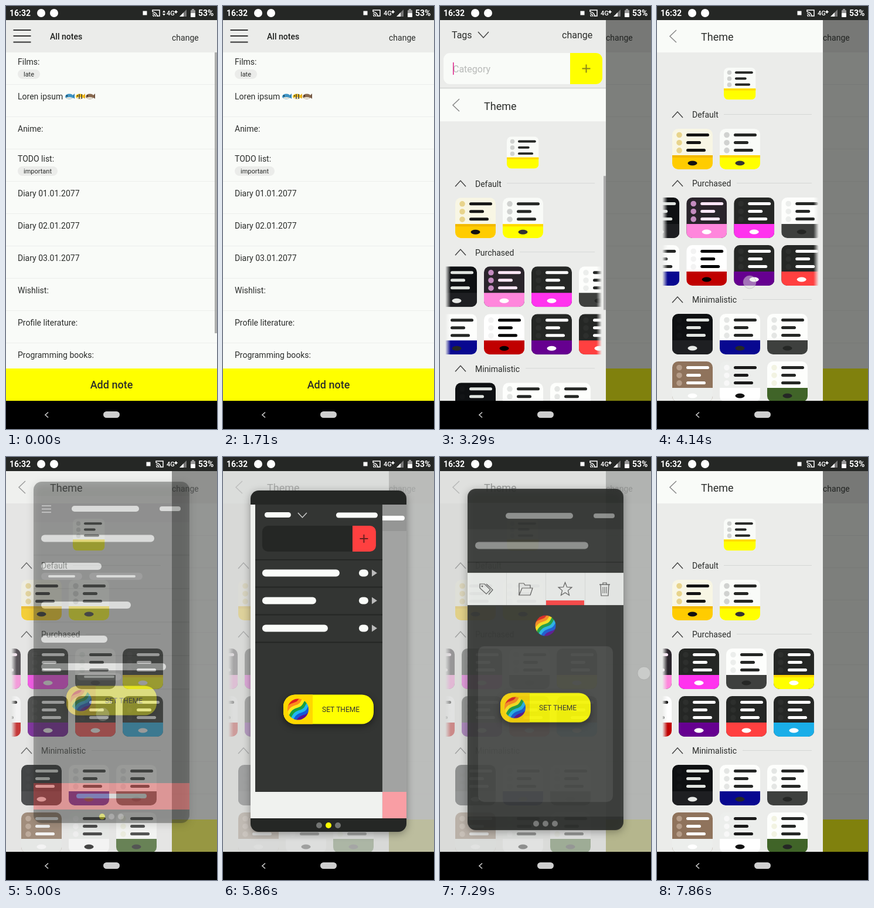
These frames come from a looping animation (360 by 720 pixels, 8 s). An HTML page with a canvas:

```html
<!DOCTYPE html>
<html lang="en">
<head>
<meta charset="utf-8">
<title>Notes app</title>
<style>
html, body { margin: 0; width: 100%; height: 100%; overflow: hidden; background: #000; }
canvas { display: block; }
</style>
</head>
<body>
<canvas id="stage" width="360" height="720"></canvas>
<script>
const LOOP = 8000, INK = '#2b2d2b', DARK = '#252725', BODY = '#333533',
      PAPER = '#f9fbf8', PANEL = '#ebecea', RED = '#ff4040', YELLOW = '#ffff00', AMBER = '#ffd800';
const screen = document.getElementById('stage').getContext('2d');
const layer = Object.assign(document.createElement('canvas'), { width: 360, height: 720 }).getContext('2d');
let c = screen;

// Timing helpers
const ramp = (t, a, b) => Math.min(1, Math.max(0, (t - a) / (b - a)));
const easeOut = (u, n) => 1 - (1 - u) ** n;
const smooth = u => u * u * (3 - 2 * u);

// Drawing helpers
function box(x, y, w, h, fill, r = 0) {
  c.fillStyle = fill;
  c.beginPath();
  c.roundRect(x, y, w, h, r);
  c.fill();
}
function oval(x, y, rx, fill, ry = rx) {
  c.fillStyle = fill;
  c.beginPath();
  c.ellipse(x, y, rx, ry, 0, 0, 7);
  c.fill();
}
function text(s, x, y, size, fill = INK, weight = 400, align = 'left') {
  c.font = `${weight} ${size}px Roboto, sans-serif`;
  c.textAlign = align;
  c.fillStyle = fill;
  c.fillText(s, x, y + size * 0.355);
}
function trace(pts) {
  c.beginPath();
  for (let i = 0; i < pts.length; i += 2) c.lineTo(pts[i], pts[i + 1]);
}
function line(pts, color, width = 1, close) {
  trace(pts);
  if (close) c.closePath();
  c.strokeStyle = color;
  c.lineWidth = width;
  c.stroke();
}
function shape(pts, fill) {
  trace(pts);
  c.fillStyle = fill;
  c.fill();
}
function group(dx, dy, draw, clip) {
  c.save();
  c.translate(dx, dy);
  if (clip) {
    c.beginPath();
    c.rect(...clip);
    c.clip();
  }
  draw();
  c.restore();
}
const bar = (x1, x2, y, fill = '#fafcf9', h = 12) => box(x1, y - h / 2, x2 - x1, h, fill, h / 2);
const arrow = (x, y, fill) => shape([x, y - 6, x + 9, y, x, y + 6], fill);
const plus = (x, y, color, r = 7) => {
  line([x - r, y, x + r, y], color, 2);
  line([x, y - r, x, y + r], color, 2);
};

function statusBar(t) {
  box(0, 0, 360, 24, DARK);
  text('16:32', 6, 12, 14, '#fff', 700);
  oval(60, 12, 7, '#fff');
  oval(82, 12, 7, '#fff');
  const busy = t < 790, x = busy ? 0 : 6;
  box(233.5 + x, 8.5, 7, 7, '#fff');
  line([250 + x, 10, 250 + x, 7, 262 + x, 7, 262 + x, 17, 257 + x, 17], '#fff', 1.5);
  for (const r of [2, 5, 8]) {
    c.beginPath();
    c.arc(250 + x, 18, r, -Math.PI / 2, 0);
    c.stroke();
  }
  if (busy) {
    shape([267, 11, 269.5, 7.5, 272, 11], '#fff');
    shape([267, 13, 269.5, 16.5, 272, 13], '#fff');
  }
  text('4G', 274, 12, 11, '#fff', 500);
  plus(290, 10, '#fff', 2.5);
  shape([296, 18, 308, 18, 308, 6], '#777');
  shape([296, 18, 303, 18, 303, 11], '#fff');
  box(315, 7, 8, 12, '#999', 1);
  box(317, 5, 4, 2, '#999');
  box(315, 12, 8, 7, '#fff', 1);
  text('53%', 328, 12, 14, '#fff', 700);
}

function navBar() {
  box(0, 672, 360, 48, '#000');
  line([72, 691.5, 67, 696, 72, 700.5], '#ccc', 1.6);
  box(166, 690, 28, 11, '#cfcfcf', 5.5);
}

function fish(x, y, body, tail, stripe) {
  shape([x + 3, y, x + 8, y - 5, x + 8, y + 4], tail);
  oval(x - 1, y, 7, body, 4.5);
  oval(x - 1, y + 2.5, 5, '#e8e4d8', 1.6);
  if (stripe) for (const d of [-2, 2]) line([x + d, y - 4, x + d, y + 4], stripe, 1.5);
  oval(x - 5, y - 1, 1, '#111');
}

const notes = ['Films:', 'Loren ipsum', 'Anime:', 'TODO list:', 'Diary 01.01.2077', 'Diary 02.01.2077',
  'Diary 03.01.2077', 'Wishlist:', 'Profile literature:', 'Programming books:'];
const noteTags = { 0: ['late', 38], 3: ['important', 68] };

function notesPage(t) {
  box(0, 24, 360, 648, PAPER);
  notes.forEach((name, i) => {
    const y = 99 + i * 55, tag = noteTags[i];
    text(name, 20, tag ? y - 4 : y, 14);
    if (tag) {
      box(20, y + 9, tag[1], 16, PANEL, 8);
      text(tag[0], 20 + tag[1] / 2, y + 17, 11, INK, 400, 'center');
    }
    box(0, y + 34, 360, 1, '#eceeec');
  });
  fish(109, 154, '#3d93c4', '#2f7fb0');
  fish(127, 154, '#f5c21c', '#e5a910', '#3a3a3a');
  fish(144, 154, '#8a6a50', '#705440');
  box(0, 24, 360, 55, PANEL);
  for (const y of [41, 51, 61.5]) line([12.5, y, 42.5, y], '#333', 2);
  text('All notes', 75, 52, 14, '#1d1f1d', 500);
  text('change', 283, 54, 14);
  box(356, 79, 4, 478, `rgba(150,150,150,${0.75 * (1 - ramp(t, 700, 870))})`);
  box(0, 617, 360, 55, YELLOW);
  text('Add note', 180, 645, 18, INK, 500, 'center');
}

const tags = [['All notes', 11], ['important', 2], ['late', 2], ['work', 1], ['ideas', 2]];

function drawer(t) {
  box(0, 24, 283, 648, PANEL);
  text('Tags', 20, 49, 16);
  line([65, 44, 74, 54, 83, 44], '#444', 1.5);
  text('change', 208, 49, 16);
  box(6, 80, 271, 53, PAPER, 11);
  box(222, 80, 55, 53, YELLOW, [0, 11, 11, 0]);
  plus(249.5, 106.5, '#8a8518');
  text('Category', 22, 107, 16, '#b8bab8');
  if (t > 2700) box(22, 96, 1.5, 21, '#e0218a');
  box(0, 139, 283, 1, '#cfd1cf');
  tags.forEach(([name, n], i) => {
    const y = 170 + i * 61;
    text(name, 20, y, i ? 14 : 16);
    text(n, i ? 251 : 254, y, i ? 12 : 15, '#444', 400, 'right');
    arrow(i ? 256 : 259, y, '#555');
    box(0, y + 30, 283, 1, '#cfd1cf');
  });
  box(0, 617, 283, 55, '#1a1c1a');
  group(0, 0, () => text('The Sun contains 99.86% of the mass in the Solar System', 111 - (t - 2000) * 0.04, 645, 16, '#fff'),
    [0, 617, 283, 55]);
}

// Theme colours: paper, dots, lines, footer, pill, strip
const onDark = (foot, strip) => [DARK, '#2d2f2d', '#fff', foot, '#fff', strip];
const onLight = (foot, dot = '#e4e6e4') => ['#fdfefc', dot, DARK, foot, DARK];
const black = ['#0e1012', '#121416', '#e0e4e0', '#1e1f22', '#e6e8e6'];
const plain = [PAPER, '#d0d2d0', DARK, YELLOW, '#333', AMBER];
const cream = ['#f8f6e4', '#e8d48c', '#141414', '#ffcc00', '#111', '#f2b800'];
const bought = [
  [black, ['#2a242b', '#c48cc0', '#ffe6f8', '#ff86dc', '#fff'], onDark('#ff33ee'), onLight('#3e403e', '#eceeec'), onDark(YELLOW, AMBER)],
  [onLight('#080890', '#fff'), ['#fff', '#f3f3f3', '#000', '#c00000', '#000'], onDark('#660090'), onDark(RED), onDark('#1aaee8')]
];
const minimal = [
  [black, onLight('#080890'), onLight('#3e403e')],
  [['#8f735c', '#b59c88', '#fff', '#eceeec', '#fff'], ['#eceeec', '#f8f8f8', '#1a1a1a', '#fff', '#111'], onLight('#406428', '#f2f3e2')]
];

function tile(x, y, [paper, dot, ink, foot, pill, strip], scale = 1) {
  c.save();
  c.translate(x, y);
  c.scale(scale, scale);
  c.beginPath();
  c.roundRect(0, 0, 69, 69, 10);
  c.clip();
  box(0, 0, 69, 69, paper);
  [39, 25, 33].forEach((w, i) => {
    oval(12, 10.5 + i * 13.2, 4.8, dot);
    bar(24, 24 + w, 10.5 + i * 13, ink, 5);
  });
  box(0, 45, 69, 24, foot);
  if (strip) box(0, 45, 69, 4, strip);
  if (scale === 1) oval(34.5, 58.5, 8, pill, 4);
  c.restore();
}

function section(name, y, x) {
  line([26, y + 5, 35, y - 5, 44, y + 5], '#444', 1.5);
  text(name, 60, y + 0.5, 14);
  box(x, y - 1, 264 - x, 1, '#d5d7d5');
}

function edgeFade(x, from, to) {
  const g = c.createLinearGradient(x, 0, x + 9, 0);
  g.addColorStop(0, `rgba(235,236,234,${from})`);
  g.addColorStop(1, `rgba(235,236,234,${to})`);
  box(x, 322, 9, 158, g);
}

function themePanel(t) {
  box(0, 24, 283, 648, PANEL);
  box(0, 24, 283, 55, PAPER);
  line([33, 41, 22, 51.5, 33, 62], '#888', 1.5);
  text('Theme', 75, 53, 18);
  tile(114, 105, plain, 0.79);
  section('Default', 185, 114);
  tile(26, 209, cream);
  tile(107, 209, plain);
  section('Purchased', 302, 136);
  const scroll = 20 + 119 * smooth(ramp(t, 3950, 4600));
  group(0, 0, () => {
    bought.forEach((row, j) => row.forEach((theme, i) => tile(14 + i * 81 - scroll, 326 + j * 81, theme)));
    edgeFade(9, 1, 0);
    edgeFade(267, 0, 1);
  }, [9, 322, 267, 158]);
  section('Minimalistic', 500, 146);
  minimal.forEach((row, j) => row.forEach((theme, i) => tile(26 + i * 81, 524 + j * 81, theme)));
  box(279, 172, 4, 228, `rgba(150,150,150,${0.75 * (1 - ramp(t, 3700, 3900))})`);
}

function ball(x, y, r) {
  c.save();
  c.beginPath();
  c.arc(x, y, r, 0, 7);
  c.clip();
  c.translate(x, y);
  c.rotate(-0.7);
  ['#e02020', '#ff8c1a', '#ffe81a', '#18a040', '#20b8f0', '#1458d8', '#5a1090'].forEach((color, i) => {
    const pts = [];
    for (let k = -20; k <= 20; k += 2) pts.push(k, (i - 3) * r * 0.3 + Math.sin(k / 5) * 2);
    line(pts, color, r * 0.33);
  });
  c.restore();
}

function previewHeader(ink) {
  box(47, 81, 266, 45, '#2c2e2c');
  bar(112, 227, 103, ink, 10);
  bar(262, 298, 103, ink, 8);
  bar(60, 253, 153.5, ink);
  box(47, 181, 266, 2, DARK);
}

function previewList() {
  box(47, 81, 266, 534, BODY);
  previewHeader('#fafcf9');
  for (const y of [98, 103.5, 109]) line([61, y, 77, y], '#ddd', 1.5);
  [[163, 201], [213, 267], [173, 325], [273, 372]].forEach(([x, y], i) => {
    bar(60, x, y);
    box(47, 238 + i * 57, 266, 2, DARK);
  });
  for (const [x, y, w] of [[60, 218, 70], [142, 218, 91], [121, 389, 76]]) {
    bar(x, x + w, y, '#555755');
    bar(x + 12, x + w - 12, y, '#fafcf9', 4);
  }
  box(47, 570, 266, 45, RED);
  bar(120, 240, 592, '#fafcf9', 8);
}

function previewDrawer() {
  box(47, 81, 266, 534, '#a2a3a2');
  box(264, 81, 49, 45, '#959695');
  bar(250, 302, 104, '#fff', 8);
  box(264, 570, 49, 45, '#f99ea4');
  box(47, 81, 217, 534, BODY);
  bar(63, 108, 98.5, '#fafcf9', 9);
  line([120, 95, 127.5, 103, 135, 95], '#ccc', 1.5);
  bar(185, 256, 99, '#fafcf9', 9);
  box(59, 117, 194, 44, DARK, 10);
  box(213, 117, 40, 44, RED, [0, 10, 10, 0]);
  plus(232.5, 139, '#6a2020');
  box(47, 174, 217, 2, DARK);
  [191, 151, 171].forEach((x, i) => {
    const y = 197.5 + i * 47;
    bar(59, x, y);
    bar(224, 240, y);
    arrow(246, y, '#bbb');
    box(47, y + 23, 217, 2, DARK);
  });
  box(47, 570, 217, 45, '#f0f2ef');
}

function previewMenu() {
  box(47, 81, 266, 534, BODY);
  previewHeader('#8d8f8d');
  box(47, 200, 266, 55, '#f0f2ef');
  for (const x of [113, 180, 247]) box(x, 200, 1, 55, '#dcdedc');
  box(181, 247, 65, 8, RED);
  const ink = '#555';
  line([68, 219, 76, 219, 86, 229, 79, 236, 68, 226], ink, 1.2, true);
  line([79, 219, 90, 229, 83, 237], ink, 1.2);
  oval(72, 223, 1.3, ink);
  line([135, 238, 135, 218, 143, 218, 145, 221, 154, 221, 154, 226], ink, 1.2);
  line([135, 238, 140, 226, 158, 226, 154, 238], ink, 1.2, true);
  const star = [];
  for (let k = 0; k < 10; k++) {
    const r = k % 2 ? 5.2 : 12, a = k * Math.PI / 5;
    star.push(213.5 + r * Math.sin(a), 228.5 - r * Math.cos(a));
  }
  line(star, ink, 1.2, true);
  line([272, 220, 290, 220], ink, 1.4);
  line([278, 220, 278, 217, 284, 217, 284, 220], ink, 1.2);
  line([274, 220, 275, 239, 287, 239, 288, 220], ink, 1.2);
  for (const x of [278, 281, 284]) line([x, 224, x, 235], ink);
  ball(180, 290, 17.5);
  box(65, 325, 230, 265, '#454745', 10);
}

function popup(t) {
  const page = easeOut(ramp(t, 5400, 6063), 3) + easeOut(ramp(t, 6420, 7080), 3);
  box(47, 57, 266, 581, DARK, 14);
  group(0, 0, () => {
    box(47, 81, 266, 534, '#f0f2ef');
    [previewList, previewDrawer, previewMenu].forEach((draw, i) => {
      const dx = (i - page) * 280;
      if (Math.abs(dx) < 270) group(dx, 0, draw, [47, 81, 266, 534]);
    });
  }, [47, 81, 266, 534]);
  c.shadowColor = 'rgba(0,0,0,.45)';
  c.shadowBlur = 12;
  c.shadowOffsetY = 4;
  box(103, 404.5, 154, 50, YELLOW, 20);
  c.shadowColor = 'transparent';
  box(103, 404.5, 50, 50, AMBER, [20, 0, 0, 20]);
  ball(128, 429.5, 18);
  text('SET THEME', 169, 430, 12, '#333');
  const active = t > 7200 ? -1 : Math.round(page);
  for (let i = 0; i < 3; i++) oval(164 + i * 16, 627, 5, i === active ? YELLOW : '#737573');
}

// Touches: start, end, x from, x to, y
const touches = [[1740, 2080, 0, 218, 457], [3950, 4250, 225, 120, 470], [4800, 4920, 165, 165, 438],
  [5380, 5580, 260, 110, 510], [6400, 6600, 260, 110, 510], [7170, 7330, 348, 348, 368]];

function fingers(t) {
  for (const [a, b, x1, x2, y] of touches) {
    if (t < a || t > b + 150) continue;
    c.globalAlpha = 1 - ramp(t, b, b + 150);
    const x = x1 + (x2 - x1) * ramp(t, a, b);
    oval(x, y, 11, 'rgba(225,227,225,.5)');
    c.strokeStyle = 'rgba(150,150,150,.4)';
    c.lineWidth = 1;
    c.stroke();
    c.globalAlpha = 1;
  }
}

function frame() {
  const t = performance.now() % LOOP;
  const open = easeOut(ramp(t, 1740, 2390), 2);
  const rise = easeOut(ramp(t, 3000, 3670), 3);
  const shown = ramp(t, 4895, 5187) * (1 - ramp(t, 7252, 7570));
  notesPage(t);
  if (open > 0) {
    box(0, 24, 360, 648, `rgba(25,27,25,${0.55 * Math.min(1, open * 1.6)})`);
    group(283 * (open - 1), 0, () => drawer(t));
  }
  if (rise > 0) group(0, 648 * (1 - rise), () => themePanel(t));
  if (shown > 0) {
    box(0, 24, 360, 648, `rgba(209,211,209,${0.74 * shown})`);
    c = layer;
    c.clearRect(0, 0, 360, 720);
    popup(t);
    c = screen;
    c.save();
    c.globalAlpha = shown;
    c.shadowColor = 'rgba(0,0,0,.35)';
    c.shadowBlur = 14;
    c.shadowOffsetY = 3;
    c.drawImage(layer.canvas, 0, -23.5 * (1 - shown));
    c.restore();
  }
  fingers(t);
  statusBar(t);
  navBar();
  requestAnimationFrame(frame);
}
frame();
</script>
</body>
</html>
```
